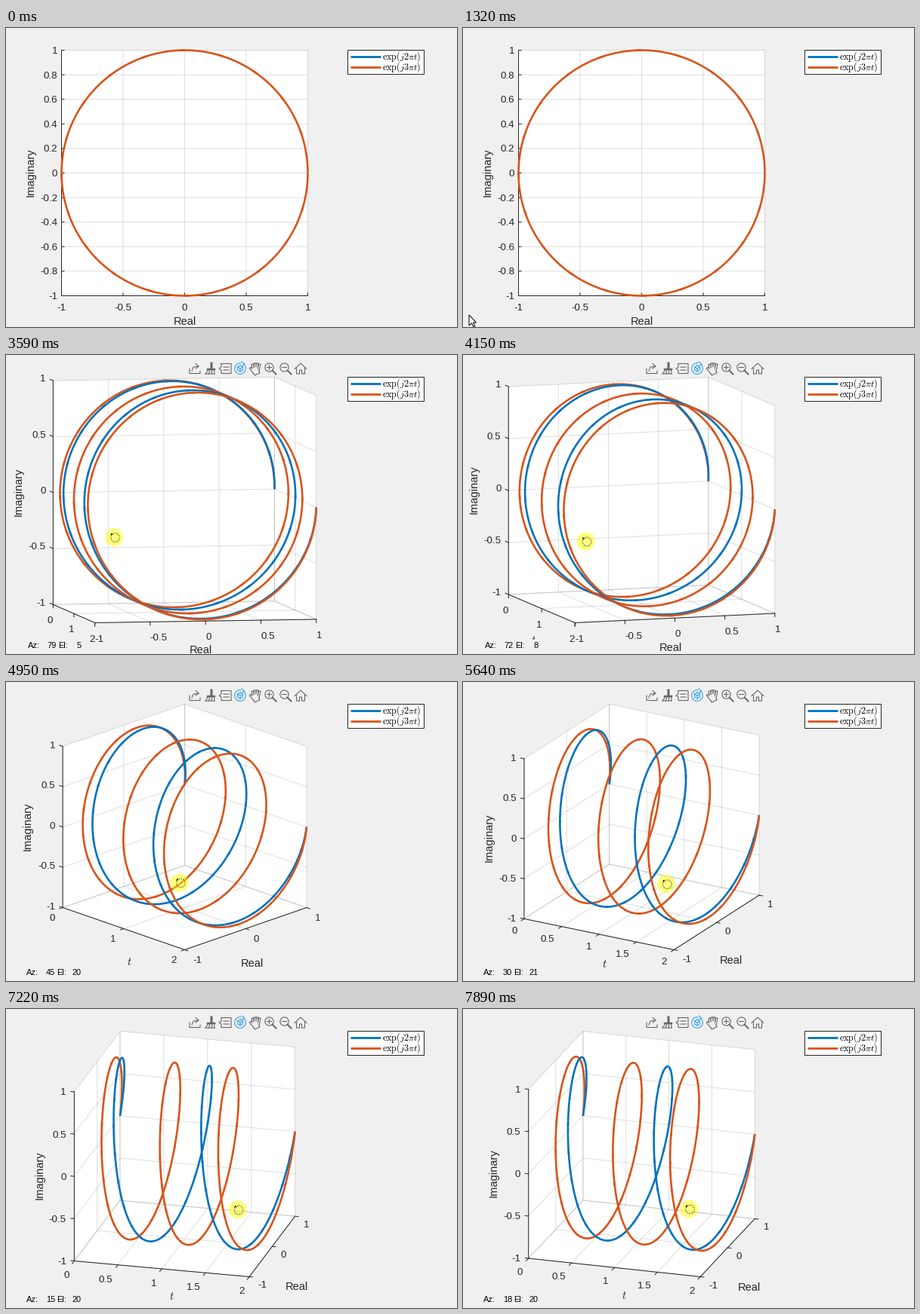
Write a matplotlib script that moves like this. It is 597 px wide and 397 px high and loops after 8000 ms.

```python
import numpy as np
import matplotlib.pyplot as plt
from matplotlib.animation import FuncAnimation
from matplotlib.collections import LineCollection
from matplotlib.lines import Line2D
from matplotlib.patches import Arc, Circle, Polygon, Rectangle

W, H, DPI = 597, 397, 64
PX = 72 / DPI                      # points per pixel
LOOP, STEP = 8000, 50
START, REFRESH = 1320, 113.3       # first movement, time between screen updates
CX, CY, SIDE = 236.5, 192.5, 326   # centre and height of the plot box
BG, INK, GREY = "#f0f0f0", "#262626", "#666666"
BLUE, ORANGE, ACTIVE = "#0072bd", "#d95319", "#35a4ec"
SIGNALS = ((2, BLUE), (3, ORANGE))  # turns within t = 0..2
PER_TURN, CHUNK = 160, 8            # points per turn, points per sorted piece

# Key views of the drag: time, azimuth, elevation
VIEWS = np.array([(2800, 90, 0), (4152, 71.63, 8.15), (4946, 45, 20.3),
                  (5625, 29.6, 21.4), (6645, 12.2, 20.7), (7891, 17.6, 19.8)]).T

plt.rcParams.update({"font.family": "Liberation Sans", "mathtext.fontset": "cm",
                     "path.snap": False})

fig = plt.figure(figsize=(W / DPI, H / DPI), dpi=DPI, facecolor=BG)
ax = fig.add_axes([0, 0, 1, 1])
ax.set_xlim(0, W)
ax.set_ylim(H, 0)
ax.axis("off")

live = []      # artists rebuilt on every frame
toolbar = []   # artists that fade in


def put(artist, z=1):
    artist.set_zorder(z)
    ax.add_artist(artist)
    return artist


def show(artist, z=1):
    live.append(put(artist, z))


def label(x, y, text, size, color=INK, z=3, va="baseline", **kw):
    return ax.text(x, y, text, fontsize=size * PX, color=color, zorder=z,
                   va=va, **kw)


def line(pts, color, width=1.0, **kw):
    x, y = zip(*pts)
    return Line2D(x, y, color=color, lw=width * PX, **kw)


def unit(v):
    return np.asarray(v) / (np.hypot(*v) or 1)


def ramp(t, start, length):
    return np.clip((t - start) / length, 0, 1)


# ---------- fixed parts ----------

def icon(*pts, color=GREY, width=1.1):
    toolbar.append(put(line(pts, color, width), 6))


def ring(x, y, r, color=GREY, start=0, end=360):
    toolbar.append(put(Arc((x, y), 2 * r, 2 * r, theta1=start, theta2=end,
                           color=color, lw=1.1 * PX), 6))


def export_icon(x, y):
    icon((x - 7, y), (x - 7, y + 6.5), (x + 7, y + 6.5), (x + 7, y + 3))
    icon((x - 4, y + 3), (x - 2, y - 2), (x + 5, y - 3))
    icon((x + 1, y - 6.5), (x + 5, y - 3), (x + 1, y))


def brush_icon(x, y):
    icon((x + 2, y - 7), (x + 2, y), width=3)
    icon((x - 3, y + 1), (x + 6, y + 1), width=2.5)
    for k in range(4):
        icon((x - 2.5 + 2.7 * k, y + 2), (x - 6 + 4 * k, y + 7))
    icon((x - 6, y + 7), (x + 6, y + 7))


def tip_icon(x, y):
    icon((x - 5, y - 6.5), (x + 8, y - 6.5), (x + 8, y + 6.5), (x - 5, y + 6.5),
         (x - 5, y + 2), (x - 8, y), (x - 5, y - 2), (x - 5, y - 6.5))
    for dy in (-2, 2):
        icon((x - 2, y + dy), (x + 5, y + dy))


def rotate_icon(x, y):
    ring(x, y, 7.3, ACTIVE, -50, 280)
    icon((x + 2, y - 9), (x + 6, y - 6), (x + 2.5, y - 4), color=ACTIVE)
    corners = [(x + 4 * np.sin(a), y - 4 * np.cos(a))
               for a in np.radians(range(0, 361, 60))]
    icon(*corners, color=ACTIVE)
    for k in (1, 3, 5):
        icon((x, y), corners[k], color=ACTIVE)


def hand_icon(x, y):
    for color, width in ((GREY, 3.6), (BG, 1.4)):
        for k in range(4):
            base = x - 2.5 + 2.2 * k
            tip = x - 3.5 + 3 * k
            icon((base, y + 2), (tip, y - 6 + 1.2 * (k - 1.5) ** 2 / 2),
                 color=color, width=width)
        icon((x - 6, y), (x - 2, y + 5), color=color, width=width)
        icon((x, y + 2), (x + 1, y + 4), color=color, width=width + 5)


def zoom_icon(x, y, plus):
    x, y = x - 1.5, y - 1.5
    ring(x, y, 5.6)
    icon((x + 4.2, y + 4.2), (x + 9, y + 9), width=2)
    icon((x - 3, y), (x + 3, y))
    if plus:
        icon((x, y - 3), (x, y + 3))


def home_icon(x, y):
    icon((x - 8, y + 0.5), (x, y - 7), (x + 8, y + 0.5))
    icon((x - 5.5, y - 1), (x - 5.5, y + 7), (x - 1.5, y + 7), (x - 1.5, y + 2),
         (x + 1.5, y + 2), (x + 1.5, y + 7), (x + 5.5, y + 7), (x + 5.5, y - 1))


def build_toolbar():
    icons = (export_icon, brush_icon, tip_icon, rotate_icon, hand_icon,
             lambda x, y: zoom_icon(x, y, True),
             lambda x, y: zoom_icon(x, y, False), home_icon)
    for k, make in enumerate(icons):
        make(250 + 20 * k, 18)


def build_legend():
    put(Rectangle((452.5, 29.5), 101, 32, fc="white", ec=INK, lw=PX), 2)
    for y, (turns, color) in zip((38.5, 52.5), SIGNALS):
        put(line([(456.5, y), (496.5, y)], color, 2.8, solid_capstyle="butt"), 3)
        label(498.3, y + 3, rf"$\exp(j{turns}\pi t)$", 12.1, "black")


# ---------- plot ----------

def make_view(az, el):
    a, e = np.radians([az, el])
    ca, sa, ce, se = np.cos(a), np.sin(a), np.cos(e), np.sin(e)
    k = SIDE / (ce + (ca + sa) * se)

    def project(t, re, im):
        x, y, z = (np.asarray(t) - 1) / 2, np.asarray(re) / 2, np.asarray(im) / 2
        sx = CX + k * (x * ca + y * sa)
        sy = CY - k * ((y * ca - x * sa) * se + z * ce)
        return np.stack([sx, sy], -1), (x * sa - y * ca) * ce + z * se

    return project


def draw_curves(project, flat):
    # Equal phase steps let overlapping pieces be compared by depth
    chunks = []
    for turns, color in SIGNALS:
        t = np.linspace(0, 2, turns * PER_TURN + 1)
        pts, depth = project(t, np.cos(np.pi * turns * t), np.sin(np.pi * turns * t))
        for i in range(0, turns * PER_TURN, CHUNK):
            chunks.append((depth[i + CHUNK // 2], i % PER_TURN,
                           pts[i:i + CHUNK + 2], color))
    chunks.sort(key=lambda c: c[0])
    if flat:
        # nearer pieces fully hide those behind them
        chunks = {c[1]: c for c in chunks}.values()
    show(LineCollection([c[2] for c in chunks], colors=[c[3] for c in chunks],
                        linewidths=2.6 * PX), 4)


def draw_axes(project, flat, low):
    def at(t, re, im):
        return project(t, re, im)[0]

    def tick_text(x, y, v, ha):
        live.append(label(x, y + 4.5, f"{round(v, 1) + 0.0:g}", 13.33, ha=ha))

    left, front, right = at(0, -1, -1), at(2, -1, -1), at(2, 1, -1)
    top = at(0, -1, 1)
    t_len, re_len = np.hypot(*(front - left)), np.hypot(*(right - front))

    t_step = 0.5 if t_len > 187 else 1 if t_len > 30 else 2
    re_step = 0.5 if re_len > 187 else 1
    im_step = 0.2 if left[1] - top[1] > 300 else 0.5
    t_ticks = np.arange(0, 2.01, t_step)
    re_ticks = np.arange(-1, 1.01, re_step)
    im_ticks = np.arange(-1, 1.01, im_step)

    hull = [left, front, right, at(2, 1, 1), at(0, 1, 1), top]
    show(Polygon(hull, fc="white", ec="none"), 0)

    grid = [[at(0, r, -1), at(0, r, 1)] for r in re_ticks]
    grid += [[at(0, -1, v), at(0, 1, v)] for v in im_ticks]
    if not flat:
        grid += [[at(0, r, -1), at(2, r, -1)] for r in re_ticks]
        grid += [[at(0, 1, v), at(2, 1, v)] for v in im_ticks]
        for t in t_ticks:
            grid += [[at(t, -1, -1), at(t, 1, -1)], [at(t, 1, -1), at(t, 1, 1)]]
    show(LineCollection(grid, colors=INK, alpha=0.15, linewidths=PX), 1)

    dark = [[top, left], [front, right]]
    mid_im, mid_re, mid_t = (top + left) / 2, (front + right) / 2, (left + front) / 2

    if flat:
        for v in im_ticks:
            p = at(0, -1, v)
            dark.append([p, p + (3.5, 0)])
            tick_text(p[0] - 5.5, p[1], v, "right")
        for r in re_ticks:
            p = at(0, r, -1)
            dark.append([p, p - (0, 3.5)])
            tick_text(p[0], p[1] + 15, r, "center")
        im_pos, re_pos = mid_im - (41, 0), mid_re + (0, 33)
    else:
        dark.append([left, front])
        out_t, out_re = unit(front - left), unit(front - right)
        for v in im_ticks:
            p = at(0, -1, v)
            dark.append([p, p - 4.5 * out_t])
            q = p - 10.5 * out_t
            tick_text(q[0], q[1] + 1, v, "right")
        rows = (([at(t, -1, -1) for t in t_ticks], t_ticks, out_re, "right"),
                ([at(2, r, -1) for r in re_ticks], re_ticks, out_t, "left"))
        for points, values, out, side in rows:
            d = np.array([0, 1]) if low else out   # ticks hang down in low views
            ha = side if low or abs(d[0]) > 0.6 else "center"
            for p, v in zip(points, values):
                dark.append([p, p + 4.5 * d])
                q = p + 11.3 * d
                tick_text(q[0], q[1] + 9.3, v, ha)

        # titles slide outwards as their axis gets steeper
        n = out_re[1]
        re_pos = mid_re + (-7.5 + 50 * n, 36.5 + 28 * n - 10 * n * n)
        n = out_t[1]
        t_pos = mid_t + (19 - 60 * n + 8 * (t_step >= 1) - 14 * low,
                         33 + 31 * n - 4 * low)
        im_pos = mid_im - (46, 0)
        live.append(label(*(t_pos + (0, 5)), "$t$", 15, ha="center"))

    live.append(label(im_pos[0], im_pos[1] - 1, "Imaginary", 14.67, rotation=90,
                      ha="center", va="center"))
    live.append(label(re_pos[0], re_pos[1] + 5.5, "Real", 14.67, ha="center"))
    show(LineCollection(dark, colors=INK, linewidths=PX, capstyle="projecting"), 2)


def draw_angles(az, el):
    show(Rectangle((18, 378), 90, 19, fc=BG, ec="none"), 7)
    dx = 2 if round(el) < 10 else 0
    for x, text, ha in ((27 + dx, "Az:", "left"), (65 + dx, f"{az:.0f}", "right"),
                        (67.5 + dx, "El:", "left"), (100, f"{el:.0f}", "right")):
        live.append(label(x, 389, text, 11, "black", 8, ha=ha))


def draw_pointer(x, y, pressed):
    if x < 70:
        arrow = np.array([(0, 0), (0, 14), (3.5, 11), (6, 16), (8, 15), (5.5, 10),
                          (9.5, 10)])
        show(Polygon(arrow + (x - 5, y - 8), fc="white", ec="black", lw=PX), 9)
        return
    if pressed:
        show(Circle((x, y), 12, fc="#ffff00", ec="none", alpha=0.5), 9)
    x, y = x + 1.5, y + 0.5
    show(Arc((x, y), 11.5, 11.5, theta1=-110, theta2=215, color="black",
             lw=PX, ls=(0, (1, 1.6))), 10)
    show(Polygon([(x - 6, y - 3), (x - 5, y - 6), (x - 2.5, y - 4.2)],
                 fc="black", ec="none"), 10)


def draw(i):
    for artist in live:
        artist.remove()
    live.clear()

    # the screen updates in steady ticks once the pointer appears
    now = i * STEP + STEP - 1
    t = START + REFRESH * np.floor((now - START) / REFRESH)
    az, el = (np.interp(t, VIEWS[0], row) for row in VIEWS[1:])
    turned = az < 90

    project = make_view(az, el)
    draw_axes(project, not turned, el < 10)
    draw_curves(project, not turned)
    if turned:
        draw_angles(az, el)
    if t >= START:
        enter = np.sin(np.pi / 2 * ramp(t, START, 453))
        settle = ramp(t, 1890, 225)
        draw_pointer(13 + 103 * enter + 2.53 * (90 - az),
                     389 - 173.5 * enter + 19 * settle + 1.57 * el, t >= 2560)
    for artist in toolbar:
        artist.set_alpha(ramp(t, 1435, 285))
    return live


build_toolbar()
build_legend()
anim = FuncAnimation(fig, draw, frames=LOOP // STEP, interval=STEP,
                     init_func=lambda: [], repeat=True, repeat_delay=0, blit=False)
plt.show()
```
